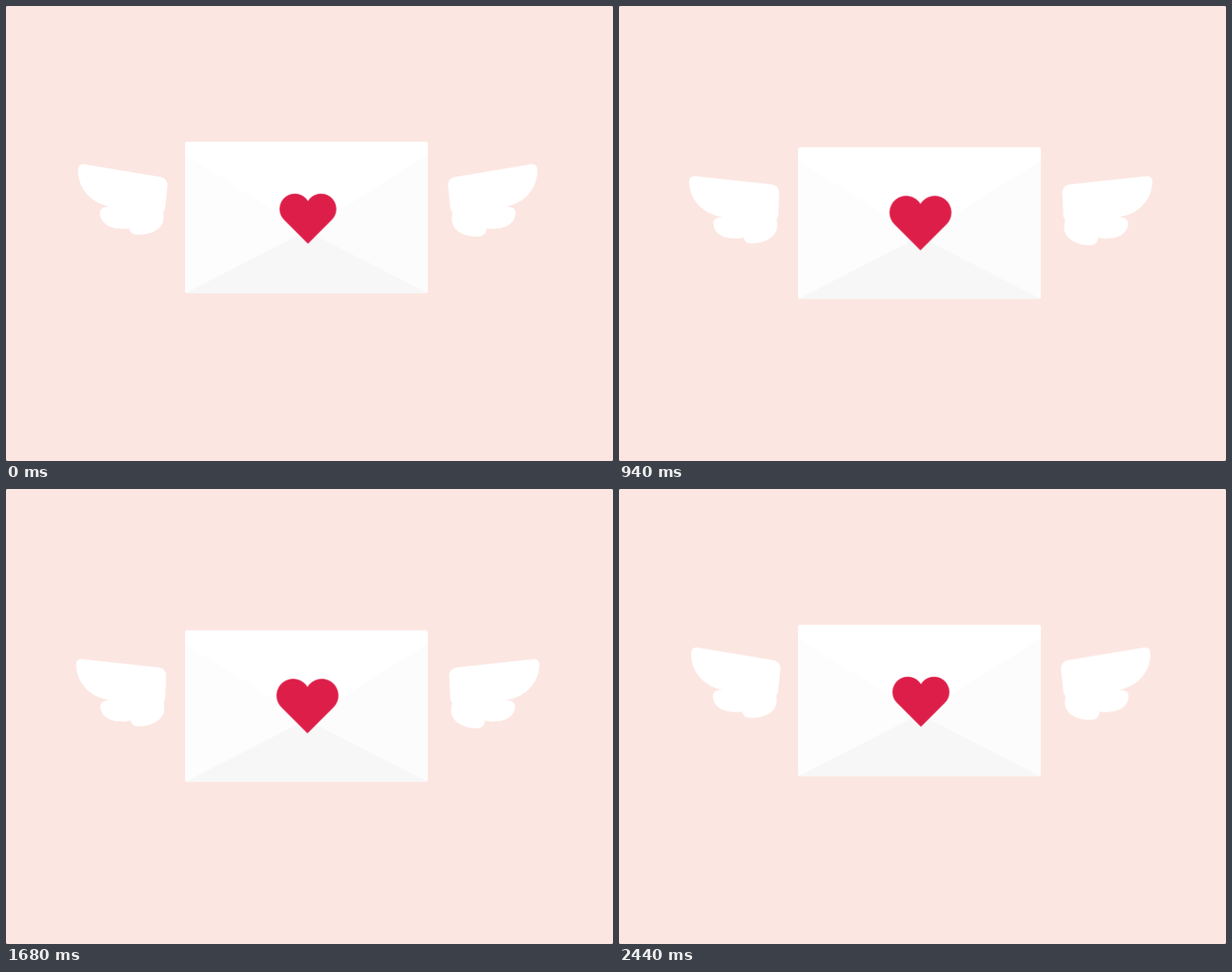
These frames come from a looping animation (800x600 px, 2.46 s). An HTML page:

```html
<!DOCTYPE html>
<html lang="en">
<head>
<meta charset="utf-8">
<title>Flying love letter</title>
<style>
  html, body { margin: 0; width: 100%; height: 100%; overflow: hidden; background: #666; }
  svg { display: block; width: 800px; height: 600px; border-radius: 2px; background: #fce6e1; }

  .letter, .wing, .heart { animation: 1230ms ease -1030ms infinite; }
  .letter { animation-name: bob; }
  .wing { animation-name: flap; transform-origin: 210px 265px; fill: #fff; }
  .heart { animation-name: beat; fill: #dd1e48; }

  @keyframes bob {
    0%, 100% { transform: translate(236px, 178px); }
    50% { transform: translate(236px, 190px); }
  }
  @keyframes flap {
    0%, 100% { transform: translateY(-1px) rotate(.4deg); }
    50% { transform: translateY(14px) rotate(-5deg); }
  }
  @keyframes beat {
    0%, 100% { transform: translate(398px, 312.4px) scale(1); }
    50% { transform: translate(397px, 326.6px) scale(1.148); }
  }
</style>
</head>
<body>
<svg viewBox="0 0 800 600">
  <defs>
    <clipPath id="card"><rect width="320" height="200" rx="3"/></clipPath>
    <path id="feathers" d="M104 208.7 L204 225.4 Q213 227.5 212.8 237 L209.5 268 L200 285 L163 293
      C148 296 127 292 124 276 C122.5 268 127 264.5 137 264.6
      C115 261 95 243 95 217 Q95 207.5 104 208.7Z"/>
    <path id="lobe" d="M209 266 Q206 270 207.5 274 C209 284 205 291 199 295
      C190 301 178 302.5 169 301 Q163 299 162 292 L175 262Z"/>
  </defs>

  <g class="wing">
    <use href="#feathers"/>
    <use href="#lobe"/>
  </g>
  <g transform="translate(795.3) scale(-1 1)">
    <g class="wing">
      <use href="#feathers"/>
      <use href="#lobe" y="2.5"/>
    </g>
  </g>

  <g class="letter">
    <g clip-path="url(#card)">
      <rect width="320" height="200" fill="#fff"/>
      <path d="M0 18 L160 118 L0 200Z" fill="#fdfdfd"/>
      <path d="M320 18 L160 118 L320 200Z" fill="#fcfcfc"/>
      <path d="M0 200 L160 118 L320 200Z" fill="#f7f7f7"/>
    </g>
  </g>

  <path class="heart" d="M0 0 L-31.1 -31.1 A19.95 19.95 0 1 1 0 -55.6 A19.95 19.95 0 1 1 31.1 -31.1Z"/>
</svg>
</body>
</html>
```
